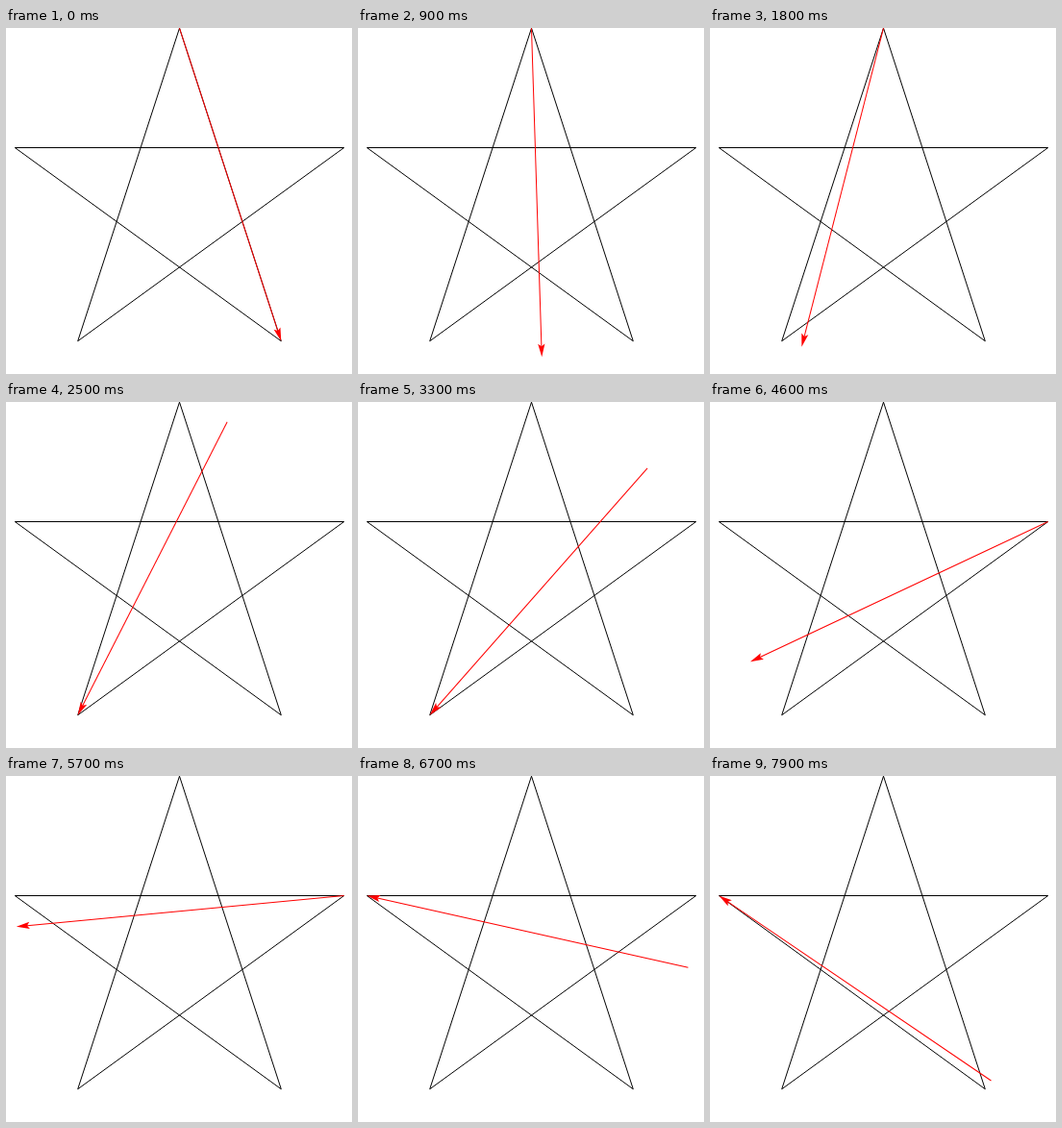
An HTML page for the animation above (8000 ms loop, 360 by 360 pixels).

```html
<!DOCTYPE html>
<html lang="en">
<head>
<meta charset="utf-8">
<title>Arrow turning through a pentagram</title>
<style>
  html, body { margin: 0; height: 100%; overflow: hidden; background: #fff; }
  svg { display: block; width: 360px; height: 360px; }
</style>
</head>
<body>
<svg viewBox="0 0 360 360">
  <path id="star" fill="none" stroke="#000" stroke-linejoin="bevel"/>
  <g id="arrow">
    <path id="shaft" stroke="#f00"/>
    <path d="M0 0L-13.8 3.6L-11.2 0L-13.8 -3.6Z" fill="#f00"/>
  </g>
</svg>
<script>
const CX = 180.5, CY = 180.15, R = 180;
const RAD = Math.PI / 180;
const SIDE = 2 * R * Math.sin(72 * RAD);
const STEP_MS = 100, STEPS_PER_TURN = 20, TURNS = 4, TURN_DEG = 36;
const el = id => document.getElementById(id);

// Corners in drawing order: top, lower right, left, right, lower left
const corners = [0, 1, 2, 3, 4].map(i => {
  const a = (144 * i - 90) * RAD;
  return [CX + R * Math.cos(a), CY + R * Math.sin(a)];
});
const [top_, , left, right, lowerLeft] = corners;
const pivots = [top_, lowerLeft, right, left];

el('star').setAttribute('d', 'M' + corners.join('L') + 'Z');
el('shaft').setAttribute('d', `M${-SIDE} 0H-11.2`);

// The arrow turns about its tail and its head alternately
function draw(now) {
  const step = Math.floor(now / STEP_MS) % (STEPS_PER_TURN * TURNS);
  const turn = Math.floor(step / STEPS_PER_TURN);
  const angle = 72 + step * TURN_DEG / STEPS_PER_TURN;
  const offset = turn % 2 ? 0 : SIDE;
  el('arrow').setAttribute('transform',
    `translate(${pivots[turn]}) rotate(${angle}) translate(${offset})`);
}

const start = performance.now();
function tick() {
  draw(performance.now() - start);
  requestAnimationFrame(tick);
}
tick();
</script>
</body>
</html>
```
